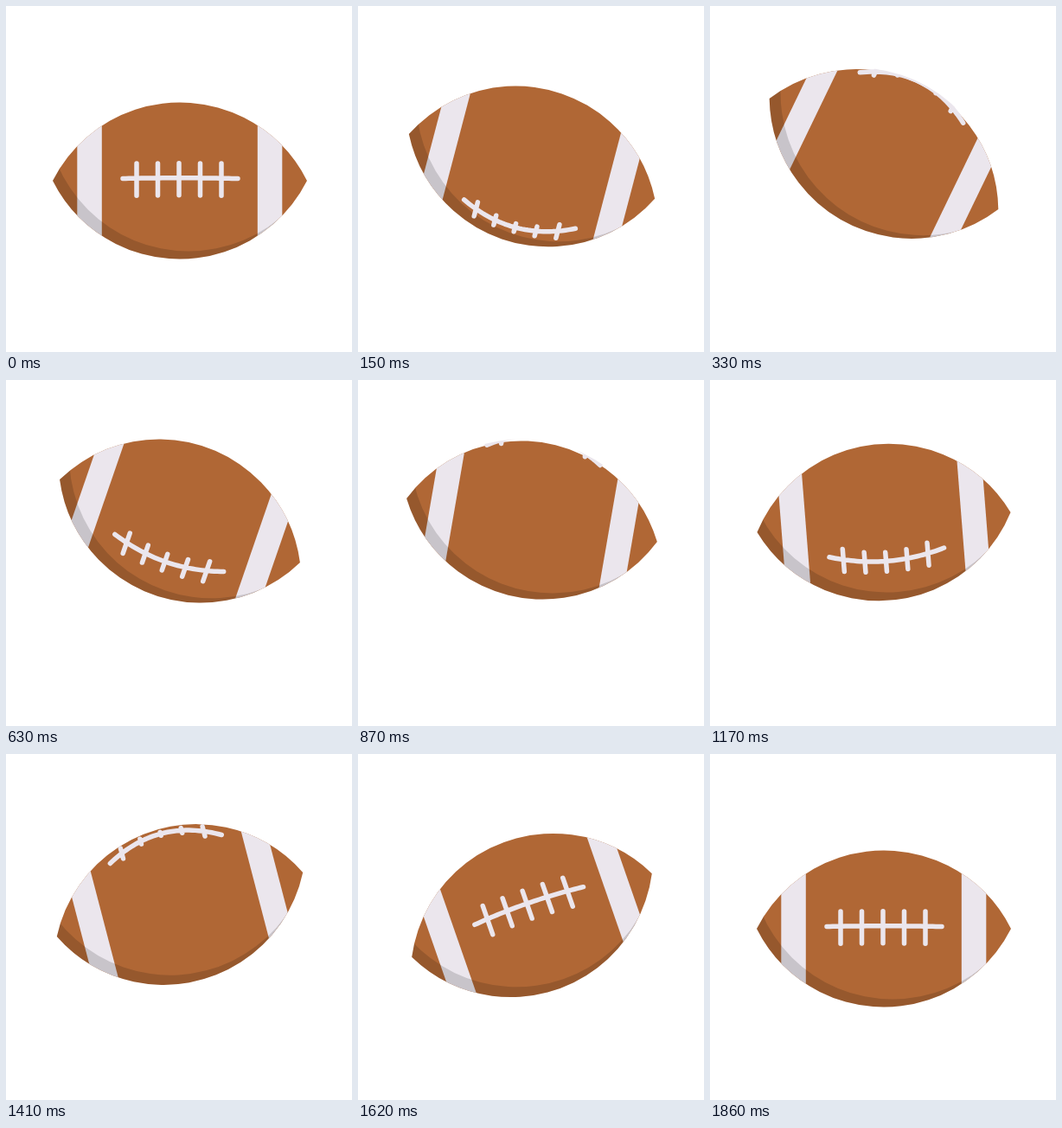
Recreate the animation shown at these times as an HTML page with a canvas. Size 400 by 400 pixels, loop 1.92 s.

```html
<!DOCTYPE html>
<html lang="en">
<head>
<meta charset="utf-8">
<title>Spinning football</title>
<style>
html, body { margin: 0; width: 100%; height: 100%; overflow: hidden; background: #fff; }
canvas { display: block; width: 400px; height: 400px; }
</style>
</head>
<body>
<canvas id="stage" width="400" height="400"></canvas>
<script>
const ctx = document.getElementById('stage').getContext('2d');
const LOOP = 1920, STEP = 30;
const BROWN = '#b06735', PALE = '#ebe6ed';

// Ball outline: two arcs of radius R whose centres lie OFF above and below the middle
const R = 164.6, OFF = 74.1;
// The lace line travels down the ball and comes round again after WRAP pixels
const WRAP = 257, EDGE = 93;

const TIMES = [0, 330, 540, 630, 870, 1170, 1620, 1860];
const tilt = curve([0, 25.8, 22.7, 19.05, 9.8, -4.5, -19.2, 0], 0.08, 0.08);
const height = curve([202, 171, 164.5, 163, 162, 164.5, 186.5, 202], -0.11, 0.06);
const roll = curve([-3.2, 164, 307, 416, 559, 756.3, 767.8].toSpliced
  ? [-3.2, 164, 264, 307, 416, 559, 756.3, 767.8]
  : [-3.2, 164, 264, 307, 416, 559, 756.3, 767.8], 0.5, 0);

// Smooth curve through the values without overshoot, with given end slopes
function curve(v, first, last) {
  const n = v.length - 1;
  const rate = i => (v[i + 1] - v[i]) / (TIMES[i + 1] - TIMES[i]);
  const slope = v.map((_, i) => {
    if (i === 0) return first;
    if (i === n) return last;
    const a = rate(i - 1), b = rate(i);
    return a * b > 0 ? 2 * a * b / (a + b) : 0;
  });
  return t => {
    if (t >= TIMES[n]) return v[n];
    let i = 0;
    while (t >= TIMES[i + 1]) i++;
    const d = TIMES[i + 1] - TIMES[i], u = (t - TIMES[i]) / d, w = 1 - u;
    return v[i] * w * w * (1 + 2 * u) + v[i + 1] * u * u * (3 - 2 * u)
      + d * u * w * (slope[i] * w - slope[i + 1] * u);
  };
}

function lens(grow) {
  const r = R + grow, a = Math.asin(OFF / r);
  ctx.beginPath();
  ctx.arc(0, OFF, r, Math.PI + a, -a);
  ctx.arc(0, -OFF, r, a, Math.PI - a);
  ctx.closePath();
}

function paintBall() {
  ctx.save();
  lens(0);
  ctx.fillStyle = BROWN;
  ctx.fill();
  ctx.clip();
  ctx.fillStyle = PALE;
  ctx.fillRect(-118.7, -100, 28.5, 200);
  ctx.fillRect(89.8, -100, 28.5, 200);
  ctx.beginPath();
  ctx.rect(-200, -200, 400, 400);
  ctx.arc(10, -OFF - 9, R, 0, Math.PI * 2);
  ctx.fillStyle = 'rgba(0,0,0,.15)';
  ctx.fill('evenodd');
  ctx.restore();
}

function paintLace(pos) {
  const m = pos - WRAP * Math.round(pos / WRAP);
  const near = Math.min(1, Math.abs(m) / EDGE);
  const lineY = x => m - m * 5e-5 * x * x;
  ctx.save();
  lens(2);
  ctx.clip();
  ctx.strokeStyle = PALE;
  ctx.lineWidth = 5.5;
  ctx.lineCap = ctx.lineJoin = 'round';
  ctx.beginPath();
  for (let x = -66; x <= 67; x += 3.5) ctx.lineTo(x, lineY(x));
  for (let i = -2; i <= 2; i++) {
    const x = i * 24.5 - 1;
    const half = 18.8 * (1 - Math.pow(near, 1.2)) + 0.0018 * near * x * x;
    const mid = lineY(x) + 1.6 * (1 - near);
    ctx.moveTo(x, mid - half);
    ctx.lineTo(x, mid + half);
  }
  ctx.stroke();
  ctx.restore();
}

function paint(t) {
  ctx.clearRect(0, 0, 400, 400);
  ctx.save();
  ctx.translate(201, height(t));
  ctx.rotate(tilt(t) * Math.PI / 180);
  paintBall();
  paintLace(roll(t));
  ctx.restore();
}

const start = performance.now();
function tick(now) {
  const t = Math.max(0, now - start) % LOOP;
  paint(Math.floor(t / STEP) * STEP);
  requestAnimationFrame(tick);
}
paint(0);
requestAnimationFrame(tick);
</script>
</body>
</html>
```
